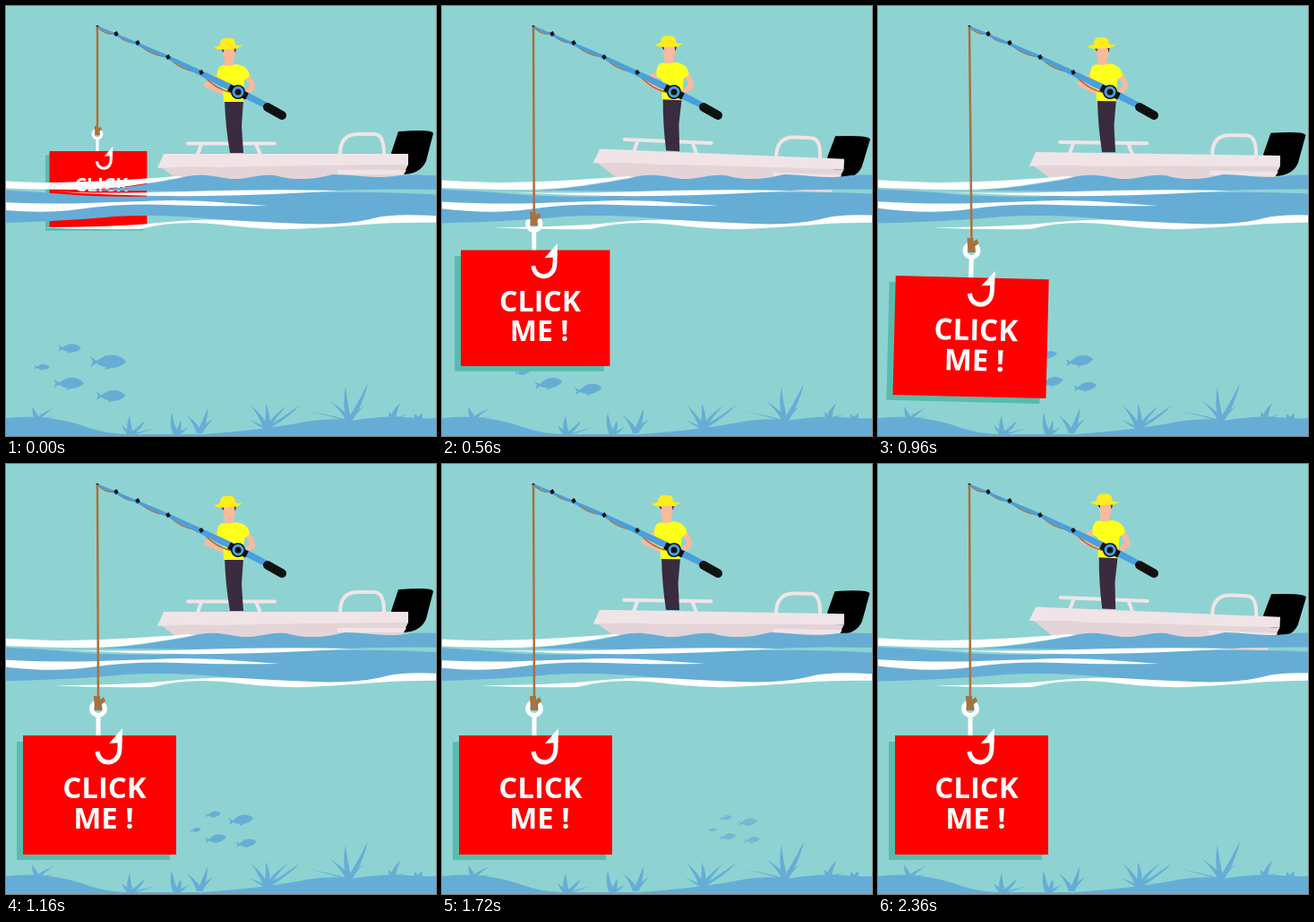
Recreate the animation shown at these times as an HTML page. Size 480 by 480 pixels, loop 2400 ms.

```html
<!DOCTYPE html>
<html>
<head>
<meta charset="utf-8">
<style>
html, body { margin: 0; width: 100%; height: 100%; overflow: hidden; background: #8ed3d2; }
svg { display: block; width: 100vw; height: 100vh; }
.water { fill: #66add6; }
.foam { fill: #fff; }
.light { fill: #f0e4e7; }
.rail { fill: none; stroke: #f0e4e7; stroke-width: 4; stroke-linecap: round; }
.skin { fill: none; stroke: #f8b99c; stroke-width: 6; stroke-linecap: round; stroke-linejoin: round; }
.hook { fill: none; stroke: #fff; stroke-width: 5; }
.line { fill: none; stroke: #a9713f; }
text { font: 700 33px "Open Sans", "Noto Sans", sans-serif; fill: #fff; text-anchor: middle; }
</style>
</head>
<body>
<svg viewBox="0 0 480 480">
  <defs>
    <path id="fish" d="M20 0C15-7 3-10-6-5L-13-1-20-6-17 0-20 6-13 2C-8 5-5 6-2 6L-4 9 4 7C11 7 16 4 20 0Z"/>
  </defs>

  <g id="bed" class="water">
    <path d="M0 460Q25 457 48 460T90 470T135 478L220 478Q290 473 335 464Q365 459 385 463Q420 457 445 459T480 460V480H0Z"/>
  </g>

  <g id="school" class="water"></g>

  <g id="boat">
    <path d="M438 140Q476 137 477 142L469 173Q463 187 444 188L430 164Z"/>
    <path class="rail" d="M203 153.500H300M218 154L214 166M279 154L284 166"/>
    <path class="rail" d="M373 165Q373 143 393 143H411Q422 143 422 165"/>
    <path fill="#e4d4d7" d="M169 177L195 196Q290 204 380 203H436L449 177Z"/>
    <path class="light" d="M176 165H449V177Q300 178 240 180Q205 178 169 181Z"/>
    <path class="light" d="M370 183H447L444 188H370Z"/>
    <path fill="#3a2b3f" d="M244 105H265L263 134 265 164H257L254 130 257 164H250Q245 135 244 105Z"/>
    <path class="skin" d="M239 77L224 88 246 98M267 76Q276 86 275 91L263 101"/>
    <path fill="#f8b99c" d="M244 56H254V68H244Z"/>
    <ellipse cx="249" cy="53" rx="7" ry="10" fill="#f8b99c"/>
    <path fill="#3a2b3f" d="M239 47H243V52ZM254 46H257L256 53Z"/>
    <path fill="#ffff1c" d="M242 66Q249 68 256 65Q270 66 272 78L266 83 265 107H243L242 85 236 82Q234 68 242 66Z"/>
    <path fill="#ffec1c" d="M239 43Q239 35 247 36Q256 34 256 43Q260 45 264 43Q261 49 248 48Q236 50 232 46Q236 46 239 43Z"/>
  </g>

  <g id="rod">
    <path class="line" stroke-width="1.500" d="M102 23Q111 33 123 31Q133 42 147 41Q160 55 181 57Q196 73 218 74Q232 94 258 98"/>
    <path fill="#4a9fdc" d="M102 22L181 55 260 91 292 108 289 114 256 98 180 59 101 24Z"/>
    <path stroke="#111" stroke-width="10" stroke-linecap="round" d="M292 113L308 122"/>
    <path stroke="#111" stroke-width="4" d="M122 29L124 33M146 39L148 43M180 55L182 59M217 72L219 76"/>
    <path stroke="#111" stroke-width="8" d="M249 91L269 101"/>
    <circle cx="259" cy="96" r="8" fill="#111"/>
    <circle cx="259" cy="96" r="5" fill="#111" stroke="#4a9fdc" stroke-width="3"/>
    <circle cx="102" cy="23" r="1.500"/>
  </g>

  <g id="bait">
    <circle class="hook" r="7.500"/>
    <path class="hook" d="M0 8V34"/>
    <path fill="#59bbae" d="M-91 37H80V169H-91Z"/>
    <path fill="#f00" d="M-84 30H87V163H-84Z"/>
    <path class="hook" d="M-1 48Q1 60 12 60Q24 58 24 43V33"/>
    <path class="foam" d="M27 22L12 39 26.500 38Z"/>
    <text x="7" y="100">CLICK</text>
    <text x="6" y="134">ME !</text>
  </g>

  <g id="waves">
    <path class="water" d="M58 207C100 207 150 201 190 193C215 185 232 190 250 193C270 194 280 187 300 189C325 196 345 193 365 188C390 188 410 194 440 189Q460 187 520 192V206Q430 203 370 206T200 207T58 207Z"/>
    <path class="water" d="M-40 204Q10 205 65 210T200 211T370 208Q430 207 520 213V237Q430 236 390 241T320 246T240 239Q180 232 120 235Q60 241 -40 243Z"/>
    <path class="foam" d="M-40 193Q0 196 40 197Q105 197 190 190L198 191C155 198 125 205 70 205Q30 205 -40 202Z"/>
    <path class="foam" d="M50 207Q110 210 200 207T372 206Q300 211 220 212T50 207Z"/>
    <path class="foam" d="M-40 217Q30 222 90 220T180 217T292 223Q230 224 180 222T80 227T-40 223Z"/>
    <path class="foam" d="M40 247Q120 247 170 242T250 239T330 243T410 237T520 238V243Q450 240 400 244T320 249T240 244T150 249Q90 250 40 247Z"/>
  </g>

  <path id="rope" class="line" stroke-width="2.500"/>
  <path id="knot" fill="#a9713f" d="M-5-14H2V-10L6-13 8-8 4-5V2H-4Z"/>
</svg>

<script>
const LOOP = 2400, STEP = 40;
const $ = id => document.getElementById(id);
const clamp = x => Math.min(1, Math.max(0, x));
const ease = x => (1 - Math.cos(Math.PI * clamp(x))) / 2;
const place = (id, value) => $(id).setAttribute('transform', value);

// A tapered leaf from its root to its tip, bulging sideways by `bend`.
function leaf(x, y, tipX, tipY, bend, w = 3) {
  const cx = (x + tipX) / 2 + bend, cy = (y + tipY) / 2;
  return `<path d="M${x - w} ${y}Q${cx - w} ${cy} ${tipX} ${tipY}Q${cx + w} ${cy} ${x + w} ${y}Z"/>`;
}

// Each tuft: root, then tips as [dx, dy, bend].
const tufts = [
  [35, 462, [-6, -15, 0], [18, -13, -4], [20, -4, -3], [-21, -2, 0]],
  [139, 479, [-1, -22, -2], [16, -16, 2], [-10, -11, 0], [28, -8, 0]],
  [190, 479, [-5, -25, -3], [5, -16, 2], [14, -9, 0]],
  [216, 477, [-14, -20, 4], [9, -28, 2], [15, -16, -3]],
  [291, 472, [-17, -26, 3], [-1, -28, 3], [23, -26, -4], [38, -27, 3], [-19, -10, 0]],
  [383, 464, [-21, -23, 5], [-4, -39, -3], [21, -43, 3], [16, -17, -4], [-47, -12, 8]],
  [432, 461, [8, -18, -3], [-5, -8, 0], [16, -5, 0]],
  [460, 463, [-4, -8, 0], [5, -9, 0]]
];
$('bed').innerHTML += tufts.map(([x, y, ...tips]) =>
  tips.map(([dx, dy, bend]) => leaf(x, y, x + dx, y + dy, bend)).join('')).join('');

const fish = [[32, -11, 1], [-11, -26, .64], [-42, -5, .44], [-12, 13, .85], [35, 27, .83]];
$('school').innerHTML = fish.map(([x, y, s]) =>
  `<use href="#fish" transform="translate(${x} ${y}) scale(${s})"/>`).join('');

function draw(now) {
  const t = Math.floor(now % LOOP / STEP) * STEP;

  const tilt = 2.4 * (t < 1200 ? ease(1 - Math.abs(t - 600) / 600) : ease((t - 1200) / 1200));
  place('boat', `rotate(${tilt} 310 168)`);

  const drift = 11 * (1 - Math.cos((t - 40) / 1560 * 2 * Math.PI));
  place('waves', `translate(${drift})`);

  const drop = ease(t / 820), grow = ease(t / 680);
  const swing = t < 1120 ? -Math.sin(t / 1120 * 2 * Math.PI) : 0;
  const x = 102 + drop + 1.9 * swing, y = 143 + 130 * drop, size = .637 + .363 * grow;
  place('bait', `translate(${x} ${y}) rotate(${1.8 * swing}) scale(${size})`);
  place('knot', `translate(${x} ${y}) scale(${size})`);
  $('rope').setAttribute('d', `M102 23L${x} ${y - 8 * size}`);

  const swim = ease(t / 2000);
  place('school', `translate(${82 + 255 * swim} 408) rotate(${-8 * ease(t / 320)}) scale(${1 - .48 * swim})`);
  $('school').setAttribute('opacity', 1 - clamp((t - 1640) / 240));
}

const start = performance.now();
function tick() {
  draw(performance.now() - start);
  requestAnimationFrame(tick);
}
tick();
</script>
</body>
</html>
```
